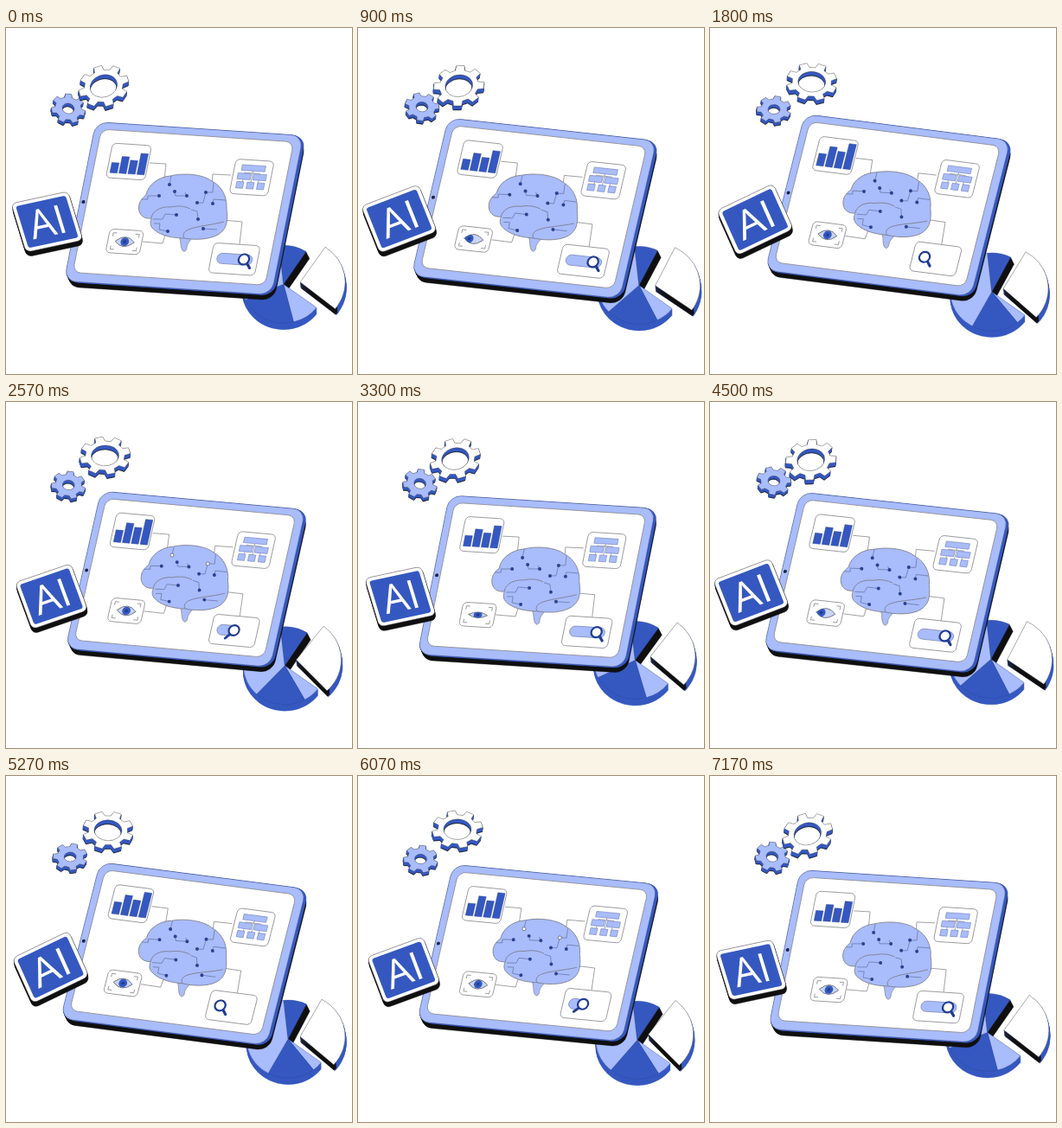
These frames come from a looping animation (400 by 400 pixels, 7.21 s). An HTML page with a canvas:

```html
<!DOCTYPE html>
<html lang="en">
<head>
<meta charset="utf-8">
<title>AI tablet</title>
<style>
html, body { margin: 0; width: 100%; height: 100%; overflow: hidden; background: #fff; }
canvas { display: block; width: 400px; height: 400px; }
</style>
</head>
<body>
<canvas id="stage"></canvas>
<script>
const LOOP = 7210, CYCLE = LOOP / 2;
const BLUE = '#3558c0', NAVY = '#213c92', LIGHT = '#a9bcfb', INK = '#111', GRAY = '#8b8b90', WHITE = '#fff';
const W = 238, H = 182; // tablet face

const canvas = document.getElementById('stage');
const ctx = canvas.getContext('2d');
const dpr = window.devicePixelRatio || 1;
canvas.width = canvas.height = 400 * dpr;

// Everything floats on one slow wave: a mean plus a cosine and a sine part.
const swayAt = p => {
  const c = Math.cos(p / CYCLE * Math.PI * 2), s = Math.sin(p / CYCLE * Math.PI * 2);
  return (mean, a, b = 0) => mean + a * c + b * s;
};

function ease(p, from, to) {
  const u = Math.min(1, Math.max(0, (p - from) / (to - from)));
  return u * u * (3 - 2 * u);
}

const pulse = (p, mid, half) => ease(p, mid - half, mid) - ease(p, mid, mid + half);

// Maps a w by h rectangle onto three corners of a tilted plate.
function plane(x, y, rx, ry, bx, by, w, h) {
  return new DOMMatrix([(rx - x) / w, (ry - y) / w, (bx - x) / h, (by - y) / h, x, y]);
}

function within(m, draw) {
  ctx.save();
  ctx.transform(m.a, m.b, m.c, m.d, m.e, m.f);
  draw();
  ctx.restore();
}

function paint(path, fill, stroke, width = 1) {
  if (fill) { ctx.fillStyle = fill; ctx.fill(path); }
  if (stroke) { ctx.strokeStyle = stroke; ctx.lineWidth = width; ctx.stroke(path); }
}

function box(x, y, w, h, r = 0) {
  const p = new Path2D();
  p.roundRect(x, y, w, h, r);
  return p;
}

function disc(x, y, r) {
  const p = new Path2D();
  p.arc(x, y, r, 0, Math.PI * 2);
  return p;
}

function placed(path, m) {
  const p = new Path2D();
  p.addPath(path, m);
  return p;
}

function extrude(path, dx, dy, color) {
  const steps = Math.ceil(Math.hypot(dx, dy));
  for (let i = steps; i > 0; i--) {
    within(new DOMMatrix().translate(dx * i / steps, dy * i / steps), () => paint(path, color, color, .4));
  }
}

function gearPath(r, hole, teeth) {
  const p = new Path2D(), step = Math.PI * 2 / teeth;
  const point = (angle, k) => p.lineTo(r * k * Math.cos(angle * step), r * k * Math.sin(angle * step));
  for (let i = 0; i < teeth; i++) {
    point(i - .31, .77);
    point(i - .2, 1);
    point(i + .2, 1);
    point(i + .31, .77);
  }
  p.closePath();
  p.moveTo(hole, 0);
  p.arc(0, 0, hole, 0, Math.PI * 2, true);
  return p;
}
const bigGear = gearPath(29.5, 16, 8), smallGear = gearPath(20, 7, 7);

function drawGear(shape, x, y, tilt, squash, spin, fill, depth) {
  const p = placed(shape, new DOMMatrix().translate(x, y).rotate(tilt).scale(1, squash).rotate(spin));
  extrude(p, -.5, depth, INK);
  extrude(p, -.5, depth - .8, BLUE);
  paint(p, fill, '#333', .4);
}

function drawGears(p, sway) {
  const turn = p / CYCLE;
  drawGear(smallGear, sway(73, -1, 1), sway(93.5, -.5, -2.4), sway(8, 8), sway(.81, .03), -turn * 360 / 7, LIGHT, 4);
  drawGear(bigGear, sway(115.3, -2.4, 1.4), sway(64.6, 2.4, 2.2), sway(-7, -10, -3), sway(.77, .03, .02), turn * 45, WHITE, 5);
}

function slice(x, y, rx, ry, from, to) {
  const p = new Path2D();
  p.moveTo(x, y);
  p.ellipse(x, y, rx, ry, 0, from * Math.PI / 180, to * Math.PI / 180);
  p.closePath();
  return p;
}

function drawPie(sway) {
  const x = sway(323.3, -2.5, 1.6), y = sway(300.6, -4.4, -3.2);
  const part = (from, to) => slice(x, y, 48, 45, from, to);
  const borders = [37, sway(64, 12), sway(137, 19), 264, sway(300, 3, -3.5)];
  extrude(part(borders[3], borders[4]), 4, 8, INK);
  extrude(part(borders[0], 200), 0, 7.5, BLUE);
  for (let i = 0; i < 4; i++) {
    paint(part(borders[i], borders[i + 1]), i % 2 ? BLUE : LIGHT, '#2a459c', .4);
  }

  const end = sway(41, -2, -5.5);
  const wedge = from => slice(sway(339.6, .5, 4), sway(297.5, -3.7, .3), 52, 49, from, end);
  const whole = wedge(sway(-58, 2, -6));
  extrude(whole, 1.5, 7, BLUE);
  extrude(wedge(end - 4), .5, 6.5, INK);
  paint(whole, WHITE, '#333', .4);
}

const brain = new Path2D(`M153.500 209C153 201 158 196 162 193C164 181 177 172 190 171
  C206 167 228 169 238 177C250 183 256 196 255 209C257 222 255 230 250 235
  C242 244 222 246 206 243C188 243 175 238 169 231C166 227 167 223 168 220C159 221 154 216 153.500 209Z`);
const stem = new Path2D('M200 241C203 247 201 253 204 257C206 260 209 257 209 254C209 250 212 247 215 243Z');
const folds = new Path2D(`M168 220C169 211 180 206 190 207C199 205 207 206 213 209
  M206 243C203 238 207 234 214 232C222 229 236 228 252 224`);
const traces = new Path2D(`M189 181L191 171M177 194H164V198H157M195 189L196 194H204L209 194
  M209 194L207 190M231 190H239L240 179M239 203L240 198L254 199M221 202L228 202L231 190
  M197 216L184 215L181 221H170M187 235L177 233L178 226H171M222 221L221 212L214 210M228 232L244 233`);
const wires = new Path2D(`M166 156L185 157L183 176M260 170L239 169L238 180
  M158 247L181 249L185 236M270 250L273 224L250 222`);
const nodes = [[189, 181], [231, 190], [177, 194], [195, 189], [209, 194], [239, 203],
  [221, 202], [197, 216], [222, 221], [187, 235], [228, 232]];

function drawBrain(p) {
  paint(wires, null, GRAY, .8);
  paint(stem, LIGHT, GRAY, .8);
  paint(brain, LIGHT, '#777985', .8);
  paint(folds, null, '#777985', .8);
  paint(traces, null, '#62709f', .7);
  const flash = pulse(p, 2465, 250) > .4;
  nodes.forEach(([x, y], i) => {
    const lit = flash && i < 2;
    paint(disc(x, y, 2), lit ? WHITE : '#2b4190', lit ? '#555' : null, .7);
  });
}

function card(x, y, w, h, draw) {
  within(new DOMMatrix().translate(x, y), () => {
    paint(box(-w / 2, -h / 2, w, h, 5), WHITE, GRAY, .8);
    draw();
  });
}

function drawBars(sway) {
  [13, 21.5, 17.5, 27].forEach((h, i) => {
    const tall = h * sway(1, -.1, -.06);
    paint(box(-19 + i * 10.4, 14 - tall, 8.4, tall), BLUE, NAVY, .4);
  });
}

function drawChart() {
  paint(new Path2D('M0 -8V-1M-9.500 -5H8.500V10M-9.500 -5V10M0 -1V10'), null, GRAY, .7);
  // Three rows: one wide box, then two, then three small ones.
  for (let row = 0; row < 3; row++) {
    const w = [27, 15, 8][row], pitch = [0, 18, 12][row];
    for (let i = 0; i <= row; i++) {
      paint(box((i - row / 2) * pitch - w / 2, -14 + row * 9.8, w, 6.5 + row / 2), LIGHT, '#7183bd', .6);
    }
  }
}

function drawEye(p) {
  for (const a of [-1, 1]) for (const b of [-1, 1]) {
    paint(new Path2D(`M${a * 15} ${b * 5.5}V${b * 9.5}H${a * 10.5}`), null, GRAY, .8);
  }
  const lid = 11 - 4.5 * pulse(p, 3300, 200);
  const gaze = -5 * (ease(p, 450, 800) - ease(p, 1100, 1500));
  const eye = new Path2D(`M-11 0Q0 ${-lid} 11 0Q0 ${lid} -11 0Z`);
  paint(eye, '#c9d5fc', '#666', .8);
  ctx.save();
  ctx.clip(eye);
  paint(disc(gaze, 0, 4.8), BLUE);
  paint(disc(gaze, 0, 1.8), NAVY);
  ctx.restore();
}

function drawSearch(p) {
  const x = 11 - 24 * (ease(p, 1000, 1650) - ease(p, 1950, 3150));
  const w = (x + 13) * 1.7;
  if (w > .5) paint(box(-20, -6, w, 12, Math.min(6, w / 2)), LIGHT, '#7783b0', .7);
  // The lens rolls over while it slides back.
  within(new DOMMatrix().translate(x, -.5).rotate(85 * pulse(p, 2500, 550)), () => {
    ctx.lineCap = 'round';
    paint(new Path2D('M4.500 4.500L8.500 9.500'), null, NAVY, 3);
    paint(disc(0, 0, 6), WHITE, NAVY, 2.2);
  });
}

const tabletPlane = sway => plane(
  sway(106.7, -2.8, -2.4), sway(104, 4.5),
  sway(344, -1.8, -.4), sway(127, -2.7, 3.3),
  sway(66, 1.6, -3.7), sway(283.8, 6.2), W, H);
const rest = tabletPlane(swayAt(0)).inverse();

function drawTablet(p, sway) {
  const m = tabletPlane(sway);
  const body = placed(box(0, 0, W + 1.5, H + 2.5, 14), m);
  extrude(body, 3, 6.5, INK);
  extrude(body, 3, 1, BLUE);
  paint(body, LIGHT, '#39477c', .5);
  within(m, () => {
    paint(box(8, 8, W - 16, H - 16, 9), WHITE, GRAY, .8);
    paint(disc(4, 92.5, 2), '#1b2547');
  });
  within(m.multiply(rest), () => drawBrain(p));
  within(m, () => {
    card(46.5, 43, 45, 40, () => drawBars(sway));
    card(190.3, 51.8, 44, 40, drawChart);
    card(60.2, 135, 39, 27.5, () => drawEye(p));
    card(189, 146.6, 53.5, 34.5, () => drawSearch(p));
  });
}

function drawTile(sway) {
  const m = plane(
    sway(7, -1, -3.3), sway(207, -4, -.9),
    sway(72.3, -.6, -2.5), sway(184.4, 4.5, -3.5),
    sway(27.3, -4.1, -2), sway(261.2, -2, -1), 66, 58);
  const body = placed(box(0, 0, 66, 58, 6), m);
  extrude(body, 1, 5.5, INK);
  paint(body, WHITE, '#333', .5);
  within(m, () => {
    paint(box(4, 4, 58, 50, 3), BLUE);
    ctx.fillStyle = WHITE;
    ctx.font = '46px "Open Sans", "Liberation Sans", sans-serif';
    ctx.textAlign = 'center';
    ctx.fillText('AI', 33, 45.5);
  });
}

function frame() {
  const p = performance.now() % CYCLE, sway = swayAt(p);
  ctx.setTransform(dpr, 0, 0, dpr, 0, 0);
  ctx.fillStyle = WHITE;
  ctx.fillRect(0, 0, 400, 400);
  ctx.lineJoin = 'round';
  drawGears(p, sway);
  drawPie(sway);
  drawTablet(p, sway);
  drawTile(sway);
  requestAnimationFrame(frame);
}
frame();
</script>
</body>
</html>
```
